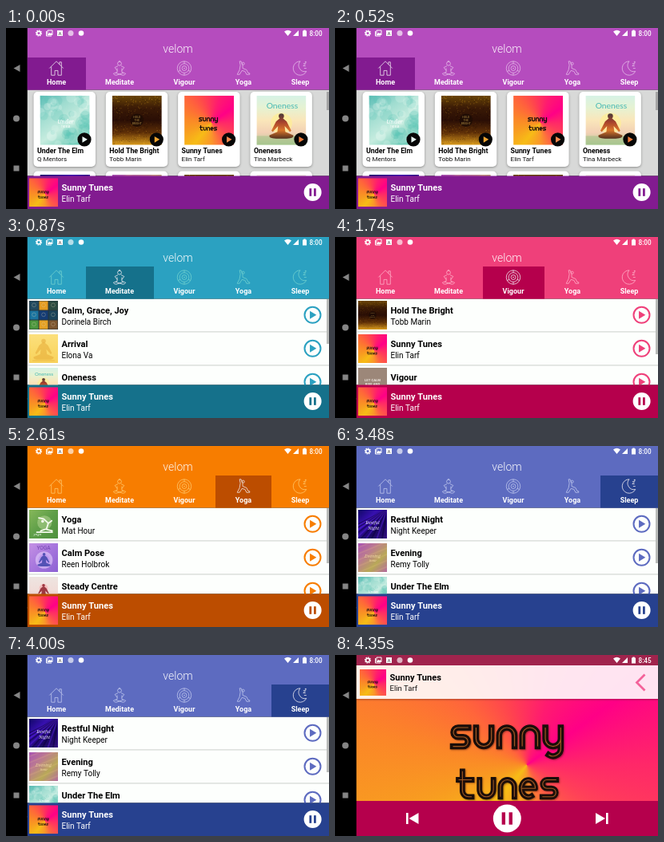
Animation, 404 px wide and 227 px high, one loop 5.22 s. Source, as an HTML page with a canvas:

```html
<!DOCTYPE html>
<html lang="en">
<head>
<meta charset="utf-8">
<title>Music player</title>
<style>
html, body { margin: 0; width: 100%; height: 100%; overflow: hidden; background: #000; }
canvas { display: block; width: 404px; height: 227px; }
</style>
</head>
<body>
<canvas id="stage"></canvas>
<script>
const W = 404, H = 227, HOLD = 870;
const LEFT = 26.5, WIDTH = W - LEFT, LIST_TOP = 77.5, BAR_TOP = 185.5;
const canvas = document.getElementById('stage');
const c = canvas.getContext('2d');
const dpr = window.devicePixelRatio || 1;
canvas.width = W * dpr;
canvas.height = H * dpr;

// ---------- helpers ----------
function rect(x, y, w, h, fill) {
  c.fillStyle = fill;
  c.fillRect(x, y, w, h);
}
function disc(x, y, r, fill) {
  c.fillStyle = fill;
  c.beginPath();
  c.arc(x, y, r, 0, 7);
  c.fill();
}
function ring(x, y, r, color, width) {
  c.strokeStyle = color;
  c.lineWidth = width;
  c.beginPath();
  c.arc(x, y, r, 0, 7);
  c.stroke();
}
function fillPath(d, fill) {
  c.fillStyle = fill;
  c.fill(new Path2D(d));
}
function line(d, color, width) {
  c.strokeStyle = color;
  c.lineWidth = width;
  c.stroke(new Path2D(d));
}
function text(s, x, y, size, color, weight = 400, align = 'left', family = 'Roboto, sans-serif') {
  c.font = `${weight} ${size}px ${family}`;
  c.fillStyle = color;
  c.textAlign = align;
  c.fillText(s, x, y);
}
function at(x, y, scale, draw) {
  c.save();
  c.translate(x, y);
  c.scale(scale, scale);
  draw();
  c.restore();
}
function gradient(x0, y0, x1, y1, ...colors) {
  const g = c.createLinearGradient(x0, y0, x1, y1);
  colors.forEach((color, i) => g.addColorStop(i / (colors.length - 1), color));
  return g;
}
function random(seed) {
  return () => (seed = (seed * 16807) % 2147483647) / 2147483647;
}

// ---------- cover lettering ----------
const GLYPHS = {
  s: 'M18 0H6A5.5 5.5 0 0 0 6 11H12A5.5 5.5 0 0 1 12 22H0',
  u: 'M0 0V13A9 9 0 0 0 18 13V0',
  n: 'M0 22V9A9 9 0 0 1 18 9V22',
  y: 'M0 0V13A9 9 0 0 0 18 13M18 0V24A9 9 0 0 1 4 32',
  t: 'M5 -11V14A8 8 0 0 0 13 22H17M0 0H17',
  e: 'M0 11H18A9 11 0 1 0 13 21'
};
function lettering(word, x, y, scale, inline) {
  [...word].forEach((ch, i) => at(x + i * 27 * scale, y, scale, () => {
    c.lineCap = 'square';
    line(GLYPHS[ch], '#1a0e0a', 7);
    c.lineCap = 'butt';
    if (inline) line(GLYPHS[ch], 'rgba(205,115,45,.75)', 1.1);
  }));
}
function burst(cx, cy) {
  const g = c.createConicGradient(0, cx, cy);
  [[0, '#ff2868'], [.08, '#ff4058'], [.17, '#ff6244'], [.25, '#fa962a'], [.36, '#f7bc16'],
   [.45, '#f89c20'], [.53, '#fb8628'], [.62, '#ff663a'], [.7, '#ff444e'], [.8, '#ff1a70'],
   [.9, '#ff0086'], [1, '#ff2868']].forEach(s => g.addColorStop(...s));
  return g;
}

// ---------- covers, all on a 60 unit square ----------
function sitter(color, x, y, scale) {
  at(x, y, scale, () => {
    disc(0, -20, 4, color);
    fillPath('M-2 -17H2L8 -12L15 2L13 4L5 -5L6 4L18 9Q20 14 8 14H-8Q-20 14 -18 9L-6 4L-5 -5L-13 4L-15 2L-8 -12Z', color);
  });
}
function caption(s, x, y, size, color, family = 'Noto Serif, serif', weight = 'italic 400') {
  text(s, x, y, size, color, weight, 'center', family);
}
const COVERS = {
  sky() {
    rect(0, 0, 60, 60, gradient(0, 0, 40, 60, '#62bdb8', '#9fdcd0', '#c6ecdf', '#74cdb9'));
    const r = random(71);
    for (let i = 0; i < 60; i++) {
      disc(r() * 60, r() * 60, 2 + r() * 6, r() < .5 ? 'rgba(75,190,175,.2)' : 'rgba(225,248,238,.25)');
    }
    caption('Under', 31, 34, 7, '#fff');
    caption('THE ELM', 31, 39, 2.6, '#fff', 'Roboto, sans-serif', '400');
  },
  gold() {
    rect(0, 0, 60, 60, gradient(0, 0, 0, 60, '#6b4606', '#3a1a06', '#2a0e05', '#5e2f07', '#d99a1c'));
    const r = random(29);
    for (let i = 0; i < 300; i++) {
      const x = r() * 59, y = r() * 59, edge = Math.abs(y - 29) / 30;
      rect(x, y, .9, .9, r() < .3 + edge * .4 ? `rgba(240,180,40,${.1 + edge * .45})` : 'rgba(20,6,2,.4)');
    }
    disc(30, 30, 8, 'rgba(25,10,5,.7)');
    ['HOLD', 'THE', 'BRIGHT'].forEach((s, i) =>
      caption(s, 30, 27 + i * 4, 3.4, '#a98540', 'Roboto, sans-serif', '400'));
  },
  sunny() {
    rect(0, 0, 60, 60, burst(33, 33));
    lettering('sunny', 18, 27, .175);
    lettering('tunes', 19, 38.5, .16);
  },
  oneness() {
    rect(0, 0, 60, 60, gradient(0, 0, 0, 60, '#d6f2e6', '#e6f2d2', '#fae6ba', '#f2d0b4', '#b2cb98'));
    disc(30, 34, 13, 'rgba(255,238,150,.75)');
    rect(0, 49, 60, 11, 'rgba(150,190,130,.45)');
    sitter(gradient(0, -24, 0, 14, '#473a3a', '#a5402c', '#d9752a', '#54301f'), 30, 41, .8);
    caption('Oneness', 31, 16, 10, '#48b9b4', 'Lato, sans-serif', '400');
  },
  tiles() {
    rect(0, 0, 60, 60, '#26343c');
    const tints = ['#224a60', '#e39c22', '#2b4a40', '#1b74a0', '#153c74', '#1a4258', '#4c963e', '#e4a024', '#7c5630'];
    tints.forEach((tint, i) => {
      const x = i % 3 * 20, y = Math.floor(i / 3) * 20;
      rect(x + .8, y + .8, 18.4, 18.4, tint);
      ring(x + 10, y + 9, 4, 'rgba(235,225,190,.45)', 1);
    });
  },
  arrival() {
    rect(0, 0, 60, 60, gradient(0, 0, 0, 60, '#fce07c', '#fad96a', '#f8d25c'));
    sitter('rgba(228,165,50,.5)', 30, 37, 1.15);
    rect(7, 54, 46, 2, 'rgba(225,160,45,.4)');
  },
  vigour() {
    rect(0, 0, 60, 60, '#9c8779');
    ['LET CALM', 'RISE AND', 'GLOW'].forEach((s, i) =>
      caption(s, 30, 29 + i * 8, 7, '#f1e9e2', 'Roboto, sans-serif', '700'));
  },
  yoga() {
    rect(0, 0, 60, 60, gradient(0, 0, 60, 60, '#87b85a', '#5e9e48', '#4f913e'));
    disc(32, 27, 15, 'rgba(200,225,165,.45)');
    c.lineCap = 'round';
    line('M16 47H48M24 44L36 40L40 28L30 19L20 17M39 29L47 23M36 41L48 44', '#f5faed', 3);
    disc(28, 24, 3, '#f5faed');
    caption('yoga', 17, 54, 7, '#fff');
  },
  pose() {
    rect(0, 0, 60, 60, gradient(0, 0, 60, 60, '#c591e4', '#a676dd', '#8d62d3'));
    disc(31, 35, 18, 'rgba(235,215,255,.55)');
    disc(31, 35, 12, 'rgba(185,145,240,.7)');
    sitter('#5352b5', 31, 38, .75);
    caption('YOGA', 30, 13, 11, '#7040ad', 'Roboto, sans-serif', '400');
  },
  centre() {
    rect(0, 0, 60, 60, gradient(0, 0, 0, 60, '#eee5e1', '#f1dcd8', '#cba8a1'));
    disc(30, 24, 9, '#f5bfbf');
    sitter('#9e3943', 30, 33, .75);
  },
  night() {
    rect(0, 0, 60, 60, gradient(0, 0, 60, 60, '#100765', '#3710af', '#180761', '#32107c'));
    for (let i = 0; i < 12; i++) {
      line(`M60 0L${i * 11 - 60} 60`, i % 2 ? 'rgba(90,35,225,.45)' : 'rgba(12,0,55,.5)', 3);
    }
    caption('Restful', 30, 30, 9, '#eee7ff');
    caption('Night', 32, 41, 9, '#eee7ff');
  },
  evening() {
    rect(0, 0, 60, 60, gradient(0, 0, 60, 60, '#a852b4', '#bb7b90', '#b8a957', '#b36aa0'));
    for (let i = 0; i < 9; i++) line(`M0 ${i * 13 - 30}L60 ${i * 13 - 55}`, 'rgba(235,190,130,.2)', 3);
    caption('Evening', 30, 30, 9, '#f1dca1');
    caption('hour', 31, 38, 7, '#f1dca1');
  }
};
function cover(name, x, y, size) {
  at(x, y, size / 60, () => {
    c.beginPath();
    c.rect(0, 0, 60, 60);
    c.clip();
    COVERS[name]();
  });
}

// ---------- data ----------
const NOW = ['sunny', 'Sunny Tunes', 'Elin Tarf'];
const SKY = ['sky', 'Under The Elm', 'Q Mentors'];
const GOLD = ['gold', 'Hold The Bright', 'Tobb Marin'];
const ONENESS = ['oneness', 'Oneness', 'Tina Marbeck'];
const TABS = [
  { label: 'Home', x: LEFT, w: 73.5, cx: 63, main: '#b54cbe', dark: '#821b90', icon: '#e5bde9',
    tracks: [SKY, GOLD, NOW, ONENESS] },
  { label: 'Meditate', x: 100, w: 85, cx: 142, main: '#2ba1c1', dark: '#15718b', icon: '#74d3d0', thumb: 56,
    tracks: [['tiles', 'Calm, Grace, Joy', 'Dorinela Birch'], ['arrival', 'Arrival', 'Elona Va'], ONENESS] },
  { label: 'Vigour', x: 185, w: 77, cx: 223, main: '#ef407a', dark: '#b5004c', icon: '#ffb3ca', thumb: 69,
    tracks: [GOLD, NOW, ['vigour', 'Vigour', '']] },
  { label: 'Yoga', x: 262, w: 70, cx: 297, main: '#f77d00', dark: '#bc4d00', icon: '#ffca70', thumb: 69,
    tracks: [['yoga', 'Yoga', 'Mat Hour'], ['pose', 'Calm Pose', 'Reen Holbrok'], ['centre', 'Steady Centre', '']] },
  { label: 'Sleep', x: 332, w: 72, cx: 368, main: '#5d6bc0', dark: '#27418f', icon: '#c3caef', thumb: 69,
    tracks: [['night', 'Restful Night', 'Night Keeper'], ['evening', 'Evening', 'Remy Tolly'], SKY] }
];
// Tab icons, centred on the origin.
const ICONS = [
  'M-9 0L0 -9L9 0M-6.5 -2V9H-2V3H2V9H6.5V-2M4 -5V-8H6.5V-2.5',
  'M-2.5 -6A2.5 2.5 0 1 1 2.5 -6A2.5 2.5 0 1 1 -2.5 -6M-1 -8.5A1 1 0 1 1 1 -8.5M-2 -3L-6 -1L-3 3M2 -3L6 -1L3 3M-3 0V5L-8 7Q-7 9 -4 9L5 6M3 0V5L8 7Q7 9 4 9L-5 6',
  'M-9 0A9 9 0 1 1 9 0A9 9 0 1 1 -9 0M-6 0A6 6 0 1 1 6 0A6 6 0 1 1 -6 0M-3 0A3 3 0 1 1 3 0A3 3 0 1 1 -3 0M0 -9V-6M0 9V6M-8 4L-5 3M8 4L5 3M-1 0H1',
  'M-5 -9L-4 -4L-5 2L-8 8H-5L-2 3L2 4L4 8H8V6.5L6 6L4 2L-1 0V-4L-3 -9ZM-2 -6A1.6 1.6 0 1 1 1.2 -6A1.6 1.6 0 1 1 -2 -6',
  'M0 -9A9 9 0 1 0 8 4A8 8 0 0 1 0 -9M4 -6H7L4 -3H7M5 0H8M7 -9V-7M6 -8H8'
];

// ---------- interface parts ----------
function triangle(x, y, r, fill) {
  fillPath(`M${x - r * .65} ${y - r}L${x + r} ${y}L${x - r * .65} ${y + r}Z`, fill);
}
function pauseButton(x, y, r, color) {
  disc(x, y, r, '#fff');
  rect(x - r * .38, y - r * .44, r * .25, r * .88, color);
  rect(x + r * .13, y - r * .44, r * .25, r * .88, color);
}
function navigation() {
  rect(0, 0, LEFT, H, '#000');
  fillPath('M9.5 50.5L17.5 46V55Z', '#858585');
  disc(13, 113.5, 4, '#858585');
  rect(9.5, 172.5, 7, 7, '#858585');
}
function statusBar(time) {
  const white = '#fff';
  c.setLineDash([1.5, 1.1]);
  ring(41, 6.5, 3.4, white, 1.4);
  c.setLineDash([]);
  ring(41, 6.5, 2.3, white, 1.5);
  line('M50.5 4V10H57M52 3H58V8.5H52Z', white, 1);
  fillPath('M52.5 8L54.5 5.5L55.5 7L56.5 6L58 8Z', white);
  rect(64, 3, 7, 7, white);
  text('A', 67.5, 9, 6, '#777', 700, 'center');
  disc(81, 6.5, 3.5, 'rgba(255,255,255,.65)');
  disc(94, 6.5, 3.3, white);
  fillPath('M348 4.5Q352.5 1 357 4.5L352.5 10Z', white);
  fillPath('M359 10L366 3V10Z', white);
  fillPath('M371 3.5H372.3V2.5H374.7V3.5H376V10.5H371Z', white);
  text(time, 379.5, 10, 8.2, white, 500);
}
function header(active) {
  const theme = TABS[active];
  rect(LEFT, 0, WIDTH, LIST_TOP, theme.main);
  statusBar('8:00');
  text('velom', 215, 31, 14, 'rgba(255,255,255,.95)', 300, 'center');
  rect(theme.x, 37, theme.w, LIST_TOP - 37, theme.dark);
  c.lineJoin = 'round';
  TABS.forEach((tab, i) => {
    at(tab.cx, 50.5, .97, () => line(ICONS[i], i === active ? '#f3eef4' : theme.icon, .8));
    text(tab.label, tab.cx, 70.5, 9, '#fff', 700, 'center');
  });
}
function trackText([, title, artist], y, color) {
  text(title, 69.5, y, 11.1, color, 700);
  text(artist, 69.5, y + 13.7, 10, color);
}
function playerBar(theme) {
  rect(LEFT, BAR_TOP, WIDTH, H - BAR_TOP, theme.dark);
  cover(NOW[0], 29, 188.3, 36);
  trackText(NOW, 204, '#fff');
  pauseButton(383.6, 206, 11, theme.dark);
}
function card(x, y) {
  c.save();
  c.shadowColor = 'rgba(0,0,0,.35)';
  c.shadowBlur = 3 * dpr;
  c.shadowOffsetY = dpr;
  c.fillStyle = '#fff';
  c.beginPath();
  c.roundRect(x, y, 77.5, 94, 5);
  c.fill();
  c.restore();
}
function homeCards() {
  rect(LEFT, LIST_TOP, WIDTH, BAR_TOP - LIST_TOP, '#d8d9d8');
  const arrows = ['#e8f8f4', '#efa431', '#ff8a50', '#ef7b3a'];
  const below = ['night', 'evening', 'gold', 'centre'];
  TABS[0].tracks.forEach(([art, title, artist], i) => {
    const x = 34.5 + i * 90.3;
    card(x, 80);
    cover(art, x + 8, 84.7, 62);
    disc(x + 63.5, 139.8, 8.6, '#060606');
    triangle(x + 63.5, 139.8, 3.9, arrows[i]);
    text(title, x + 4.5, 156.5, 8.8, '#000', 700);
    text(artist, x + 4.5, 167, 8, '#111');
    card(x, 179.5);
    cover(below[i], x + 8, 184, 62);
  });
  rect(401, 80, 3, 23, '#a4a4a4');
}
function trackList(theme) {
  rect(LEFT, LIST_TOP, WIDTH, BAR_TOP - LIST_TOP, '#fdfffd');
  theme.tracks.forEach((track, i) => {
    const y = 77 + i * 42;
    cover(track[0], 29, y + 3, 36);
    trackText(track, y + 19, '#000');
    ring(383.5, y + 20.8, 10, theme.main, 2);
    triangle(383.3, y + 20.8, 5, theme.main);
    rect(LEFT, y + 41.3, WIDTH, 1.2, '#d4d8d4');
  });
  rect(401, 78, 3, theme.thumb, '#b9bbb9');
}
function browse(active) {
  const theme = TABS[active];
  if (active) trackList(theme);
  else homeCards();
  header(active);
  playerBar(theme);
}
function nowPlaying() {
  const dark = '#b5004c';
  rect(LEFT, 13, WIDTH, 170, burst(240, 138));
  c.save();
  c.beginPath();
  c.rect(LEFT, 55, WIDTH, 128);
  c.clip();
  c.shadowColor = 'rgba(70,20,10,.5)';
  c.shadowBlur = 2 * dpr;
  c.shadowOffsetX = c.shadowOffsetY = dpr;
  lettering('sunny', 147.5, 91, 1.07, true);
  lettering('tunes', 154.5, 156.5, .97, true);
  c.restore();
  rect(LEFT, 55, WIDTH, 3, gradient(0, 55, 0, 58, 'rgba(80,20,20,.35)', 'rgba(80,20,20,0)'));
  rect(LEFT, 13, WIDTH, 42, 'rgba(255,255,255,.89)');
  rect(LEFT, 0, WIDTH, 13, '#a0244d');
  statusBar('8:45');
  cover(NOW[0], 31, 18, 33);
  text(NOW[1], 68.5, 32, 11.1, '#000', 700);
  text(NOW[2], 68.5, 45.3, 9.5, '#111');
  c.lineCap = 'butt';
  c.lineJoin = 'miter';
  line('M387.5 24.5L377.5 34.5L387.5 44.5', '#f4629a', 2.8);
  rect(LEFT, 183, WIDTH, 44, dark);
  rect(89, 198, 2.6, 14, '#fff');
  fillPath('M104.5 198V212L92.5 205Z', '#fff');
  pauseButton(215.3, 205, 17.5, dark);
  fillPath('M326 198V212L338 205Z', '#fff');
  rect(339, 198, 2.6, 14, '#fff');
}

// ---------- loop ----------
let shown = -1;
const start = performance.now();
function tick(now) {
  const scene = Math.floor(Math.max(0, now - start) / HOLD) % 6;
  if (scene !== shown) {
    shown = scene;
    c.setTransform(dpr, 0, 0, dpr, 0, 0);
    rect(0, 0, W, H, '#000');
    if (scene < TABS.length) browse(scene);
    else nowPlaying();
    navigation();
  }
  requestAnimationFrame(tick);
}
tick(start);
</script>
</body>
</html>
```
